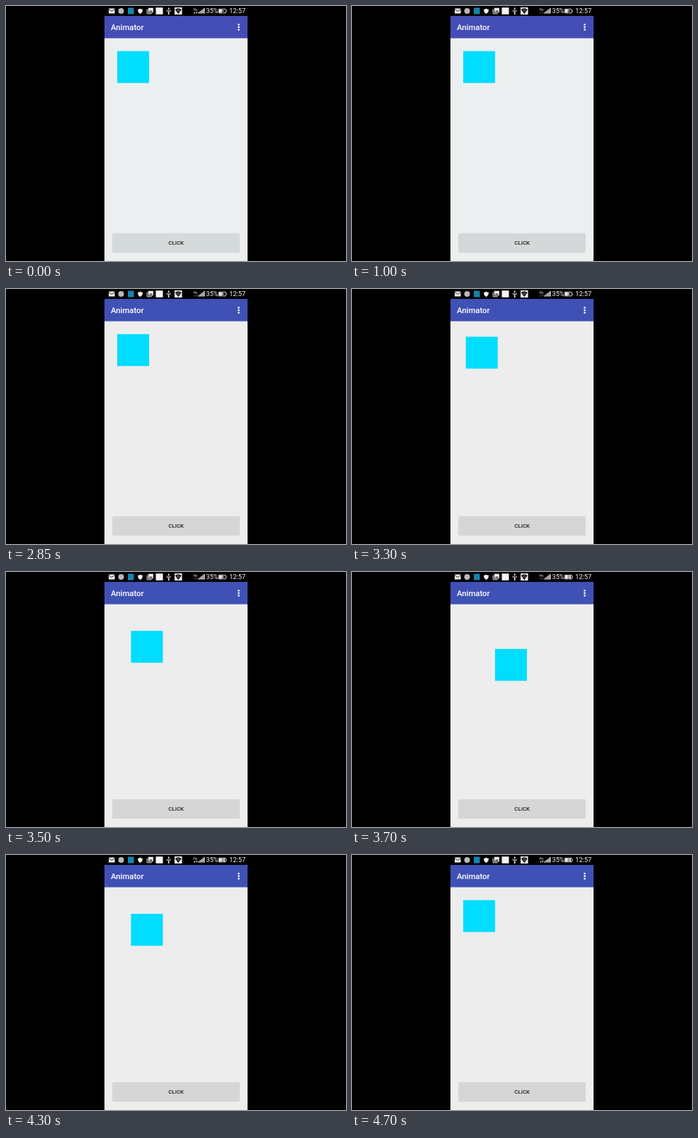
Write an HTML page that moves like this. It is 480x360 px and loops after 4850 ms.

```html
<!DOCTYPE html>
<html lang="en">
<head>
<meta charset="utf-8">
<title>Square there and back</title>
<style>
  html, body { margin: 0; width: 100%; height: 100%; overflow: hidden; background: #000; }
  svg { display: block; width: 100vw; height: 100vh; }
  text { font-family: Roboto, sans-serif; fill: #fff; }
</style>
</head>
<body>
<svg viewBox="0 0 480 360">
  <rect width="480" height="360" fill="#000"/>
  <rect id="page" x="139" y="45" width="202" height="315" fill="#ededed"/>
  <rect id="bar" x="139" y="14" width="202" height="31.5" fill="#3f51b5"/>

  <!-- notification icons -->
  <g fill="#f4f4f4">
    <path d="M145 3.5h8.5v7H145z"/>
    <path d="M145 4.5l4.2 3 4.3-3" fill="none" stroke="#000" stroke-width=".9"/>
    <circle cx="162.5" cy="7" r="4" fill="#b9b9b9"/>
    <rect x="172" y="2.5" width="8.5" height="9" fill="#1683b5"/>
    <path d="M186 4.5l1.7.3 1.8-1.3 1.8 1.3 1.7-.3-.6 4-2.9 2.7-2.9-2.7z"/>
    <path d="M199.2 4.5v6.3h6.5" fill="none" stroke="#f4f4f4"/>
    <path d="M200.8 2.7h7v6.6h-7z"/>
    <path d="M201.8 8.2l1.6-2.1 1.2 1.3 1-1.5 1.3 2.3z" fill="#222"/>
    <rect x="211.5" y="2.2" width="10" height="9.6"/>
    <path d="M229.7 3v8M227.3 5.4v2l2.4 1.5 2.4-1.7V5.4" fill="none" stroke="#f4f4f4" stroke-width=".9"/>
    <path d="M228.4 4l1.3-2 1.3 2z"/>
    <circle cx="229.7" cy="11" r="1.1"/>
    <rect x="238" y="2" width="10.5" height="10"/>
    <path d="M238.7 5q4.5-3.5 9 0l-4.5 6.2z" fill="#000"/>
    <path d="M240.6 6.2q2.6-1.8 5.2 0M241.8 8q1.4-.9 2.8 0" fill="none" stroke="#f4f4f4" stroke-width=".6"/>
  </g>

  <!-- signal, battery, clock -->
  <text x="264.5" y="6.8" font-size="4.6">H+</text>
  <g id="traffic" fill="#e8e8e8">
    <path d="M265 10.5l1.3-2.4 1.3 2.4zM268 8.3h2.6l-1.3 2.4z"/>
  </g>
  <g id="bars" fill="#e8e8e8"></g>
  <text x="282.5" y="10.4" font-size="9.2">35%</text>
  <path d="M300.4 4.3h9.4v1.5h1.3v2.6h-1.3v1.5h-9.4z" fill="none" stroke="#e8e8e8" stroke-width=".9"/>
  <rect id="charge" x="301" y="4.8" width="4" height="4.6" fill="#e8e8e8"/>
  <path d="M306.6 3.6l-2.2 4h1.7l-.7 3 2.5-4h-1.7l1.3-3z" fill="#fff" stroke="#000" stroke-width=".4"/>
  <text x="315.3" y="10.4" font-size="9.2">12:57</text>

  <text x="148" y="34" font-size="11.35" font-weight="500">Animator</text>
  <g fill="#fff">
    <circle cx="328.5" cy="26.3" r="1.3"/>
    <circle cx="328.5" cy="29.9" r="1.3"/>
    <circle cx="328.5" cy="33.5" r="1.3"/>
  </g>

  <rect x="150.3" y="321.3" width="179.6" height="27" rx="1" fill="#000" opacity=".1"/>
  <rect id="button" x="150.3" y="320.8" width="179.6" height="26.8" rx="1" fill="#d6d6d6"/>
  <text x="240.2" y="337.3" font-size="7.9" font-weight="500" text-anchor="middle" style="fill:#222">CLICK</text>

  <rect id="square" x="157" y="63.7" width="45" height="45" fill="#00ddff"/>
</svg>
<script>
  const LOOP = 4850, TICK = 50;
  const START = 3150, DURATION = 1500, TRAVEL = 151.4;
  const el = id => document.getElementById(id);

  el('bars').innerHTML = [0, 1, 2, 3, 4].map(i => {
    const h = 1.8 + i * 1.5;
    return `<rect x="${271.4 + i * 1.95}" y="${10.6 - h}" width="1.4" height="${h}"/>`;
  }).join('');

  // One eased sweep from 0 to 1, folded at the middle into there and back.
  function offset(t) {
    const x = Math.min(1, Math.max(0, (t - START) / DURATION));
    const eased = (1 - Math.cos(Math.PI * x)) / 2;
    return TRAVEL * Math.min(eased, 1 - eased);
  }

  // [from, page, bar, button, traffic opacity, charge width]
  const looks = [
    [0, '#ebeff0', '#444db5', '#d4d9d9', 1, 4],
    [50, '#ecefef', '#444db5', '#d5d8d9', .35, 4],
    [1850, '#ededed', '#424eb5', '#d5d7d8', .35, 4],
    [2350, '#ededed', '#3f51b5', '#d6d6d6', .35, 5.5],
    [3600, '#ededed', '#3f51b5', '#d6d6d6', .35, 8],
    [4150, '#ededed', '#3f51b5', '#d6d6d6', 1, 8]
  ];

  function draw(now) {
    const t = Math.floor((now % LOOP) / TICK) * TICK;
    const d = offset(t);
    el('square').setAttribute('transform', `translate(${d} ${d})`);
    const [, page, bar, button, traffic, charge] = looks.filter(look => look[0] <= t).pop();
    el('page').setAttribute('fill', page);
    el('bar').setAttribute('fill', bar);
    el('button').setAttribute('fill', button);
    el('traffic').setAttribute('opacity', traffic);
    el('charge').setAttribute('width', charge);
  }

  const origin = performance.now();
  function frame() {
    draw(performance.now() - origin);
    requestAnimationFrame(frame);
  }
  frame();
</script>
</body>
</html>
```
